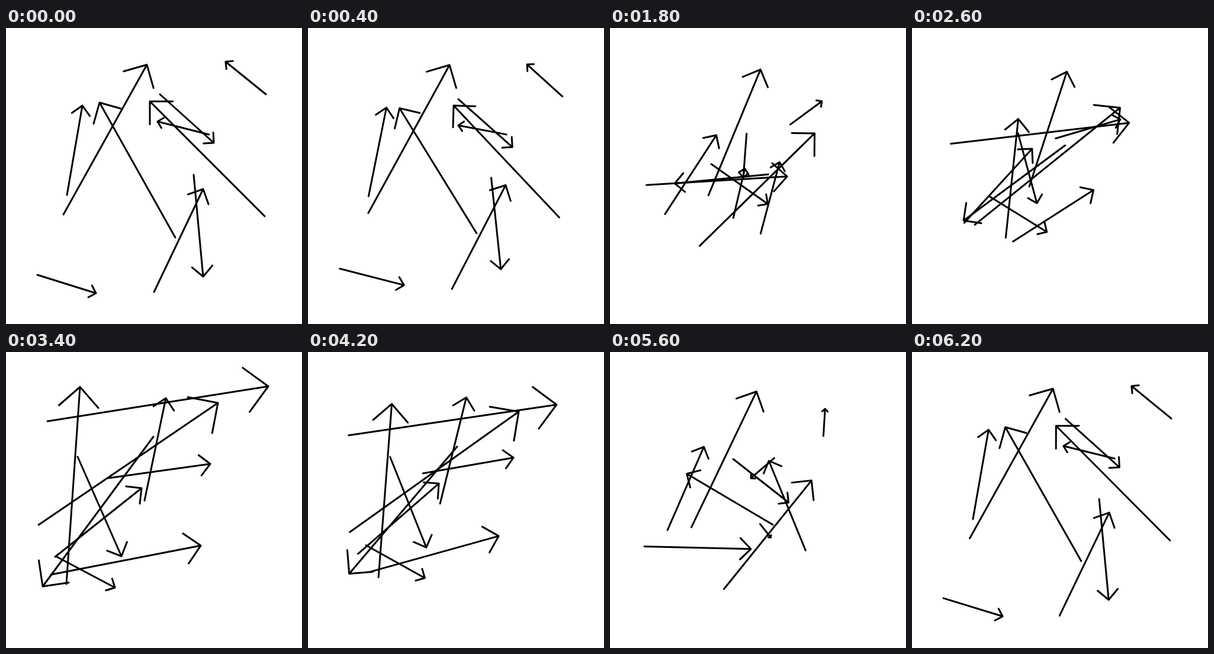
These frames come from a looping animation (500 by 500 pixels, 6400 ms). An HTML page with a canvas:

```html
<!DOCTYPE html>
<html lang="en">
<head>
<meta charset="utf-8">
<title>Arrows</title>
<style>
html, body { margin: 0; width: 100%; height: 100%; overflow: hidden; background: #fff; }
canvas { display: block; width: 500px; height: 500px; }
</style>
</head>
<body>
<canvas id="stage" width="500" height="500"></canvas>
<script>
const ctx = document.getElementById('stage').getContext('2d');
const SIZE = 500, LOOP = 6400, STEP = 200;

// Start pose and end pose of each arrow: tail x, y, tip x, y
const arrows = [
  [[97, 315, 238, 62], [234, 251, 270, 78]],
  [[53, 417, 152, 448], [70, 117, 443, 58]],
  [[439, 112, 371, 57], [173, 213, 345, 189]],
  [[437, 318, 243, 124], [76, 376, 329, 327]],
  [[250, 446, 333, 272], [55, 292, 358, 86]],
  [[286, 354, 158, 126], [249, 143, 62, 396]],
  [[103, 282, 129, 131], [83, 346, 229, 230]],
  [[260, 112, 351, 194], [84, 345, 184, 398]],
  [[317, 248, 333, 420], [102, 392, 125, 59]],
  [[343, 180, 256, 158], [121, 177, 195, 345]]
];

const mix = (a, b, k) => a + (b - a) * k;

// Distance covered at unit speed after speeding up over the first n steps
const ramp = (s, n) => s < n ? s * s / (2 * n) : s - n / 2;

// Rise, brief pause, rise to the end pose, then a faster return
function progress(step) {
  if (step < 13) return 0.0733 * ramp(step, 4.2);
  if (step < 18) return Math.min(1, 0.738 + 0.0655 * (step - 13));
  return 1 - 0.0972 * ramp(step - 18, 5.5);
}

// The head's two barbs lie at 45 degrees, a tenth of the shaft along and across
function drawArrow(x0, y0, x1, y1) {
  const bx = (x0 - x1) / 10, by = (y0 - y1) / 10;
  ctx.beginPath();
  ctx.moveTo(x0, y0);
  ctx.lineTo(x1, y1);
  ctx.moveTo(x1 + bx - by, y1 + by + bx);
  ctx.lineTo(x1, y1);
  ctx.lineTo(x1 + bx + by, y1 + by - bx);
  ctx.stroke();
}

function draw(time) {
  const p = progress(Math.floor((time % LOOP) / STEP));
  ctx.fillStyle = '#fff';
  ctx.fillRect(0, 0, SIZE, SIZE);
  for (const [from, to] of arrows) {
    drawArrow(...from.map((v, i) => mix(v, to[i], p)));
  }
}

ctx.strokeStyle = '#000';
ctx.lineWidth = 3;
ctx.lineCap = ctx.lineJoin = 'round';

const start = performance.now();
function tick() {
  draw(performance.now() - start);
  requestAnimationFrame(tick);
}
tick();
</script>
</body>
</html>
```
